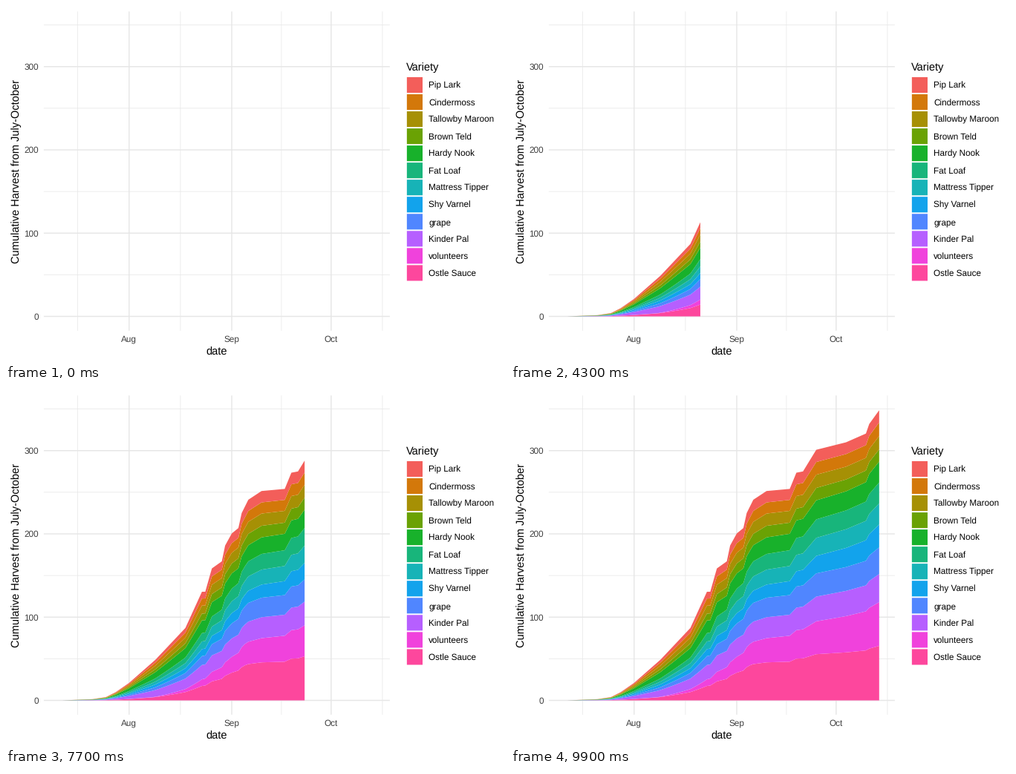
Animation of 672 by 480 pixels, one loop 10000 ms. Source, as a matplotlib script:

```python
import numpy as np
import matplotlib.pyplot as plt
from matplotlib.animation import FuncAnimation
from matplotlib.patches import Polygon, Rectangle

plt.rcParams["font.family"] = "Liberation Sans"
plt.rcParams["text.hinting"] = "none"

W, H, DPI = 672, 480, 96
FRAMES, LAST_DAY = 100, 95
LEFT, RIGHT, TOP, BOTTOM = 50.9, 516.9, 7.4, 437.8
GRID, TICK = "#E6E6E6", "#404040"
KEY = 23.04

# Name, colour and percent of the harvest at each of SHARE_DAYS
SHARE_DAYS = (28, 56, 95)
VARIETIES = [
    ("Pip Lark", "#F35E5A", (7, 5.6, 4.2)),
    ("Cindermoss", "#D3780A", (8, 5.4, 4.7)),
    ("Tallowby Maroon", "#A69005", (9, 6, 4.6)),
    ("Brown Teld", "#6AA204", (7, 5.7, 4.2)),
    ("Hardy Nook", "#18B12B", (16, 8, 7.2)),
    ("Fat Loaf", "#18B57B", (8, 7.5, 7.2)),
    ("Mattress Tipper", "#17B3B7", (7, 7.1, 7.3)),
    ("Shy Varnel", "#12A3EC", (7, 6, 7.9)),
    ("grape", "#5086FF", (7, 9.3, 9.2)),
    ("Kinder Pal", "#B65FFF", (17, 10, 9.7)),
    ("volunteers", "#F042DC", (.5, 11, 15.1)),
    ("Ostle Sauce", "#FD479D", (8, 18, 18.8)),
]

# Turning points of the total: (days since July 11, harvest)
TOTAL = [
    (1, 0), (10, 1.5), (14, 4), (17, 10), (21, 21), (29, 49), (38, 87),
    (43, 130.5), (44, 130.5), (46, 158.5), (49, 167), (50, 186), (52, 200.5),
    (54, 207), (55, 225), (57, 241), (61, 251.5), (68, 254), (70, 273.5),
    (72, 275), (76, 301), (85, 310), (91, 320.5), (92, 332), (95, 348.5),
]


def px(day):
    return 72.1 + 4.46 * day


def py(value):
    return 418.5 - 1.1225 * value


def stack_levels(days):
    """Layer edges per day, from zero up to the total."""
    shares = np.array([np.interp(days, SHARE_DAYS, s)
                       for *_, s in reversed(VARIETIES)])
    parts = shares / shares.sum(axis=0) * np.interp(days, *zip(*TOTAL))
    return np.vstack([0 * days, parts.cumsum(axis=0)])


fig = plt.figure(figsize=(W / DPI, H / DPI), dpi=DPI, facecolor="white")
ax = fig.add_axes([0, 0, 1, 1])
ax.set_xlim(0, W)
ax.set_ylim(H, 0)
ax.axis("off")


def line(xs, ys, width):
    ax.plot(xs, ys, color=GRID, lw=width * 72 / DPI, snap=False,
            solid_capstyle="butt", zorder=1)


def label(x, y, text, size=8.8, color="black", ha="left", **kw):
    ax.text(x, y, text, fontsize=size, color=color, ha=ha, va="baseline", **kw)


def draw_grid():
    for day in (5.5, 36.5, 67, 97.5):
        line([px(day)] * 2, [TOP, BOTTOM], .71)
    for value in range(50, 400, 100):
        line([LEFT, RIGHT], [py(value)] * 2, .71)
    for day, month in ((21, "Aug"), (52, "Sep"), (82, "Oct")):
        line([px(day)] * 2, [TOP, BOTTOM], 1.42)
        label(px(day), 452.6, month, color=TICK, ha="center")
    for value in range(0, 400, 100):
        line([LEFT, RIGHT], [py(value)] * 2, 1.42)
        label(44.2, py(value) + 4.2, str(value), color=TICK, ha="right")
    label((LEFT + RIGHT) / 2, 470.6, "date", 11, ha="center")
    label(18, (TOP + BOTTOM) / 2, "Cumulative Harvest from July-October", 11,
          ha="center", rotation=90, rotation_mode="anchor")


def draw_legend():
    left, side = 538.9, KEY - 1.89
    label(left, 87, "Variety", 11)
    for i, (name, color, _) in enumerate(VARIETIES):
        mid = 106.5 + KEY * i
        ax.add_patch(Rectangle((left + .95, mid - side / 2), side, side,
                               fc=color, lw=0, snap=False))
        label(569.3, mid + 4.2, name)


draw_grid()
draw_legend()

DAYS = np.arange(LAST_DAY + 1)
LEVELS = stack_levels(DAYS)
# Each day lands on a whole frame; the frames between are interpolated.
DAY_FRAMES = np.round(DAYS * (FRAMES - 1) / LAST_DAY)

areas = [ax.add_patch(Polygon([(0, 0)] * 3, fc=color, lw=0, zorder=3))
         for _, color, _ in reversed(VARIETIES)]


def update(frame):
    head = np.interp(frame, DAY_FRAMES, DAYS)
    days = np.append(DAYS[DAYS < head], head)
    xs = px(days)
    edges = [py(np.interp(days, DAYS, row)) for row in LEVELS]
    for area, low, high in zip(areas, edges, edges[1:]):
        area.set_xy(np.column_stack([np.r_[xs, xs[::-1]],
                                     np.r_[high, low[::-1]]]))
    return areas


anim = FuncAnimation(fig, update, frames=FRAMES, interval=100, repeat=True,
                     repeat_delay=0, blit=False)
plt.show()
```
